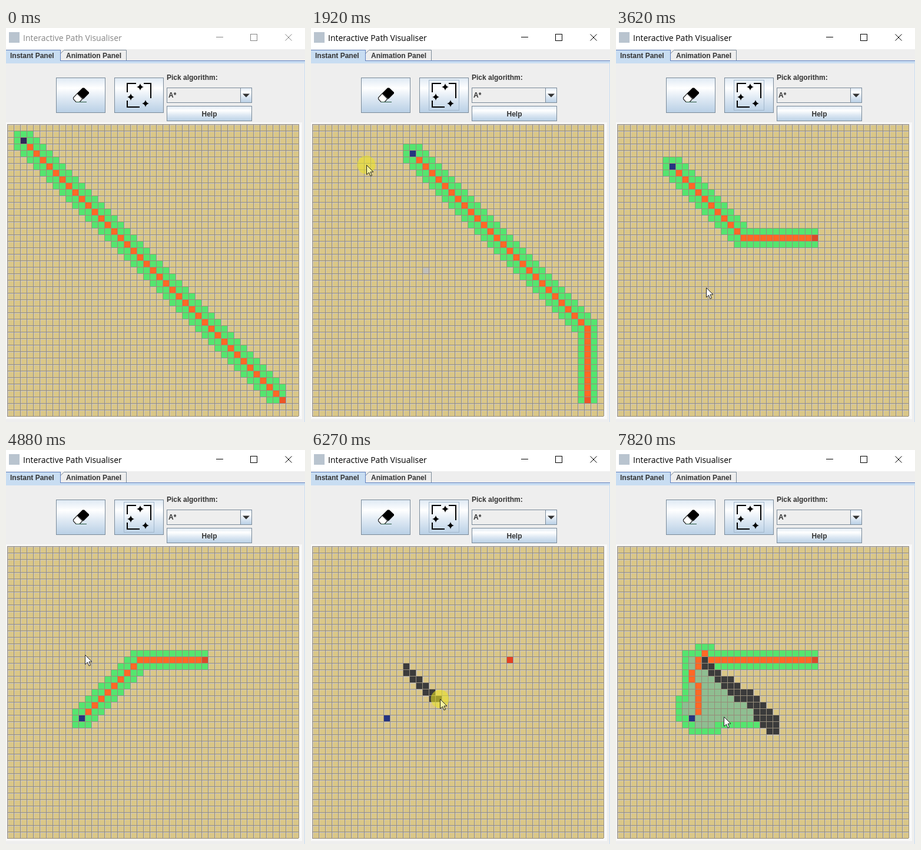
Write an HTML page with a canvas that moves like this. It is 508 by 668 pixels and loops after 8 s.

```html
<!DOCTYPE html>
<html lang="en">
<head>
<meta charset="utf-8">
<title>Interactive Path Visualiser</title>
<style>
html, body { margin: 0; width: 100%; height: 100%; overflow: hidden; background: #eee; }
canvas { display: block; width: 508px; height: 668px; }
</style>
</head>
<body>
<canvas id="stage" width="508" height="668"></canvas>
<script>
const ctx = document.getElementById('stage').getContext('2d');
const LOOP = 8000, SIZE = 45, CELL = 11, LEFT = 2, TOP = 163;
const COLOR = {
  tan: '#dac788', open: '#55e56f', path: '#ff6825', closed: '#8fbe91',
  wall: '#3b3b3b', border: '#7a8a99', text: '#333'
};
const FOCUSED = 860, CLEARED = 5360, DRAG = 5700, TURN = 6500, DRAG_END = 7260, SOLVED = 7620;

// when each search is replaced, with its start and end cell
const SEARCHES = [
  { until: 910, start: [2, 2], end: [42, 42] },
  { until: 1970, start: [15, 4], end: [42, 42] },
  { until: 2690, start: [8, 6], end: [42, 42] },
  { until: 4220, start: [8, 6], end: [30, 17] },
  { until: LOOP, start: [11, 26], end: [30, 17] }
];
const DETOUR = [[11, 26], [12, 25], [12, 21], [11, 20], [11, 19], [12, 18], [12, 17], [13, 16], [30, 17]];
const STROKE_DOWN = [[14, 18], [19, 23], [21, 24], [24, 28]];
const STROKE_BACK = [[24, 28], [23, 26], [19, 22], [17, 21], [17, 20], [15, 20], [13, 18], [13, 17]];

const ENTRY = [400, 640];
const MOVES = [
  { from: 140, to: 670, at: [176, 208] },
  { from: 1210, to: 1670, at: [94, 232] },
  { from: 1970, to: 2440, at: [338, 357] },
  { from: 3000, to: 3700, at: [130, 451] },
  { from: 4630, to: 4900, at: [134, 339] },
  { from: 5100, to: 5210, at: [136, 347] },
  { from: 5410, to: DRAG, at: [162, 367] }
];
const REST = [183, 452];
const PRESSES = [[FOCUSED, 910], [1820, 1970], [2590, 2690], [3720, 3820], [5210, CLEARED], [DRAG, SOLVED]];

const clamp = v => Math.max(0, Math.min(1, v));
const progress = (t, from, to) => clamp((t - from) / (to - from));
const mix = (a, b, k) => a.map((v, i) => v + (b[i] - v) * k);

// steps from point to point, leaving out each segment's last cell
function walk(points, step) {
  const cells = [];
  for (let i = 1; i < points.length; i++) {
    let pos = points[i - 1];
    const goal = points[i];
    while (pos[0] !== goal[0] || pos[1] !== goal[1]) {
      cells.push(pos);
      const [dx, dy] = step(goal[0] - pos[0], goal[1] - pos[1]);
      pos = [pos[0] + dx, pos[1] + dy];
    }
  }
  return cells;
}
const diagonal = (dx, dy) => [Math.sign(dx), Math.sign(dy)];
const staircase = (dx, dy) => Math.abs(dx) > Math.abs(dy) ? [Math.sign(dx), 0] : [0, Math.sign(dy)];

const down = walk(STROKE_DOWN, staircase);
const WALLS = [...down, ...walk(STROKE_BACK, staircase), STROKE_BACK[STROKE_BACK.length - 1]];
const isWall = (col, row) => WALLS.some(c => c[0] === col && c[1] === row);

function exploreBehindWall(route) {
  const cells = [...route, [10, 24], [10, 25]];
  for (let row = 17; row <= 26; row++) {
    for (let col = 11; !isWall(col, row); col++) cells.push([col, row]);
  }
  for (let col = 12; col <= 14; col++) cells.push([col, 27]);
  return cells;
}
const detourRoute = walk(DETOUR, diagonal);
const detourExplored = exploreBehindWall(detourRoute);

// position along the wall stroke, in cells; negative before it begins
function strokeAt(t) {
  if (t < DRAG) return -1;
  if (t < TURN) return down.length * progress(t, DRAG, TURN) ** 2;
  const back = 1 - (1 - progress(t, TURN, DRAG_END)) ** 1.6;
  return down.length + (WALLS.length - 1 - down.length) * back;
}

function pointerAt(t) {
  if (t < DRAG) {
    return MOVES.reduce((pos, m) => mix(pos, m.at, progress(t, m.from, m.to)), ENTRY);
  }
  const s = strokeAt(t), i = Math.floor(s);
  const [col, row] = mix(WALLS[i], WALLS[Math.min(i + 1, WALLS.length - 1)], s - i);
  const drag = [LEFT + (col + .5) * CELL, TOP + (row + .5) * CELL];
  return mix(drag, REST, progress(t, SOLVED, 7820));
}

function rect(x, y, w, h, fill) {
  ctx.fillStyle = fill;
  ctx.fillRect(x, y, w, h);
}

function frame(x, y, w, h, color) {
  ctx.strokeStyle = color;
  ctx.lineWidth = 1;
  ctx.strokeRect(x + .5, y + .5, w - 1, h - 1);
}

function shape(points, fill, stroke, width = 1, close = true) {
  ctx.beginPath();
  points.forEach(([x, y]) => ctx.lineTo(x, y));
  if (close) ctx.closePath();
  if (fill) { ctx.fillStyle = fill; ctx.fill(); }
  if (stroke) { ctx.strokeStyle = stroke; ctx.lineWidth = width; ctx.stroke(); }
}

function label(text, x, y, align = 'left') {
  ctx.font = 'bold 12px "Liberation Sans", Arial, sans-serif';
  ctx.textAlign = align;
  ctx.fillStyle = COLOR.text;
  ctx.fillText(text, x, y);
}

function button(x, y, w, h) {
  const g = ctx.createLinearGradient(0, y, 0, y + h);
  g.addColorStop(0, '#dde8f3');
  g.addColorStop(.3, '#fff');
  g.addColorStop(.6, '#dde8f3');
  g.addColorStop(1, '#b8cfe5');
  rect(x, y, w, h, g);
  frame(x, y, w, h, COLOR.border);
}

function drawTitleBar(active) {
  const ink = active ? '#000' : '#858585';
  rect(0, 0, 508, 36, '#fff');
  rect(5, 7, 18, 18, '#b9c4cf');
  ctx.font = '14px "Open Sans", "Noto Sans", sans-serif';
  ctx.textAlign = 'left';
  ctx.fillStyle = ink;
  ctx.fillText('Interactive Path Visualiser', 29, 22);
  rect(357, 15, 12, 1, ink);
  frame(415, 10, 12, 12, ink);
  shape([[474.5, 10.5], [485.5, 21.5]], null, ink, 1, false);
  shape([[485.5, 10.5], [474.5, 21.5]], null, ink, 1, false);
}

function drawTabs() {
  rect(0, 37, 92, 20, '#c8ddf2');
  rect(0, 56, 508, 4, '#c8ddf2');
  shape([[92.5, 55], [92.5, 43.5], [98.5, 37.5], [204.5, 37.5], [204.5, 55]], '#eee', COLOR.border, 1, false);
  rect(92, 55, 416, 1, '#6382bf');
  rect(0, 37, 92, 1, '#6382bf');
  rect(92, 37, 1, 19, '#6382bf');
  label('Instant Panel', 7, 51);
  label('Animation Panel', 102, 51);
}

function drawEraser() {
  shape([[121, 111], [130, 120], [125, 125.5], [119, 125.5], [114.5, 120.5], [114.5, 118]], '#fff', '#222', 1.2);
  shape([[130, 101.5], [133, 101.5], [141, 109], [141, 111], [131.5, 120.5], [121, 110.5]], '#000');
  rect(119, 125, 18, 1, '#24583f');
}

function star(x, y) {
  ctx.beginPath();
  ctx.moveTo(x + 6, y);
  for (let i = 1; i <= 4; i++) {
    const a = i * Math.PI / 2, b = a - Math.PI / 4;
    ctx.quadraticCurveTo(x + 1.5 * Math.cos(b), y + 1.5 * Math.sin(b), x + 6 * Math.cos(a), y + 6 * Math.sin(a));
  }
  ctx.fillStyle = '#000';
  ctx.fill();
}

function drawSparkles() {
  [
    [[221, 94], [206, 94], [206, 109]],
    [[234, 94], [246, 94], [246, 119]],
    [[206, 123], [206, 134], [227, 134]]
  ].forEach(line => shape(line, null, '#000', 2, false));
  star(228, 100);
  star(212, 117);
  star(237, 128);
}

function drawControls(active) {
  button(85, 84, 84, 60);
  drawEraser();
  button(184, 84, 84, 60);
  if (active) frame(200, 88, 52, 52, '#a3b8cc');
  drawSparkles();
  label('Pick algorithm:', 273, 88);
  frame(273, 101, 145, 26, COLOR.border);
  button(398, 101, 20, 26);
  shape([[402, 111.5], [414, 111.5], [408, 117.5]], COLOR.text);
  label('A*', 276, 118);
  button(273, 132, 145, 26);
  label('Help', 345.5, 150, 'center');
}

function cell([col, row], color) {
  rect(LEFT + col * CELL + 1, TOP + row * CELL + 1, CELL - 1, CELL - 1, color);
}

function drawGrid() {
  const span = SIZE * CELL;
  rect(0, 160, 503, 503, '#f8f8f8');
  rect(LEFT, TOP, span, span, COLOR.tan);
  const rule = (offset, color) => {
    for (let p = offset; p <= span; p += CELL) {
      rect(LEFT + p, TOP, 1, span, color);
      rect(LEFT, TOP + p, span, 1, color);
    }
  };
  rule(1, '#cac8ca');
  rule(0, '#958c7a');
  rect(507, 60, 1, 608, '#c8ddf2');
}

function drawSearch(explored, route) {
  for (const [x, y] of explored) {
    for (let i = 0; i < 9; i++) cell([x - 1 + i % 3, y - 1 + Math.floor(i / 3)], COLOR.open);
  }
  explored.forEach(c => cell(c, COLOR.closed));
  route.forEach(c => cell(c, COLOR.path));
}

function drawBoard(t) {
  const { start, end } = SEARCHES.find(s => t < s.until);
  if (t >= 910) cell([17, 22], '#c3c0b8');
  if (t < CLEARED) {
    const route = walk([start, end], diagonal);
    drawSearch(route, route);
  } else if (t >= SOLVED) {
    drawSearch(detourExplored, detourRoute);
  }
  WALLS.slice(0, Math.floor(strokeAt(t)) + 1).forEach(c => cell(c, COLOR.wall));
  cell(start, t < FOCUSED ? '#30285a' : '#253480');
  cell(end, t >= CLEARED && t < SOLVED ? '#e64022' : t < 2690 ? '#ee5527' : '#d94a2a');
}

function drawPointer(t) {
  if (t < MOVES[0].from) return;
  const [x, y] = pointerAt(t).map(Math.round);
  const arrow = [[0, 0], [0, 16], [4, 12.5], [6.5, 18.5], [9, 17.5], [6.5, 11.5], [11.5, 11.5]];
  const pressed = PRESSES.some(([from, to]) => t >= from && t < to);
  if (pressed) {
    ctx.beginPath();
    ctx.arc(x, y, 15.5, 0, Math.PI * 2);
    ctx.fillStyle = 'rgba(236,229,32,.56)';
    ctx.fill();
  }
  shape(arrow.map(([dx, dy]) => [x + dx + .5, y + dy + .5]), pressed ? '#f4f1a0' : '#fff', '#222');
}

function draw(now) {
  const t = now % LOOP, active = t >= FOCUSED;
  rect(0, 0, 508, 668, '#eee');
  drawTitleBar(active);
  drawTabs();
  drawControls(active);
  drawGrid();
  drawBoard(t);
  drawPointer(t);
}

const began = performance.now();
function tick() {
  draw(performance.now() - began);
  requestAnimationFrame(tick);
}
tick();
</script>
</body>
</html>
```
